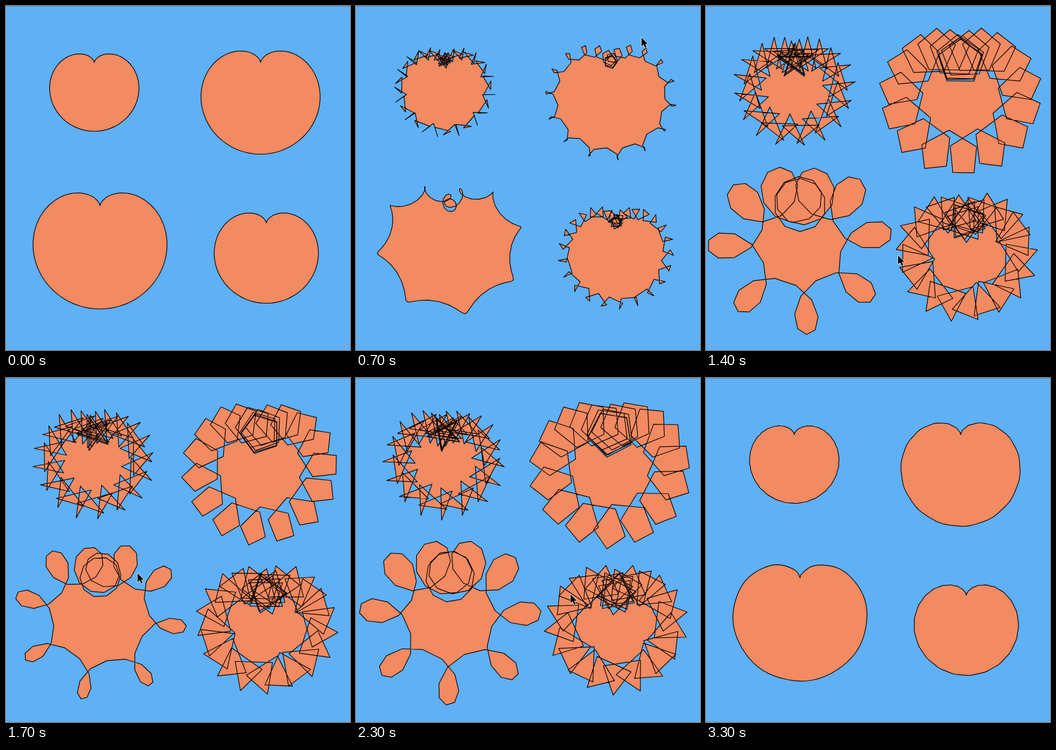
Write an HTML page with a canvas that moves like this. It is 600 px wide and 600 px high and loops after 3.4 s.

```html
<!DOCTYPE html>
<html lang="en">
<head>
<meta charset="utf-8">
<title>Cardioids</title>
<style>
  html, body { margin: 0; width: 100%; height: 100%; overflow: hidden; background: #5fb0f5; }
  canvas { display: block; width: 600px; height: 600px; }
</style>
</head>
<body>
<canvas id="stage" width="600" height="600"></canvas>
<script>
const ctx = document.getElementById('stage').getContext('2d');
const LOOP = 3400, STEP = 100, POINTS = 100;
const FIRST = 1, LAST = 28; // steps with the pointer on stage
const REST = 0.4;           // ripple left once the pointer is gone

const hearts = [
  { x: 154, y: 98.5, size: 60 },
  { x: 444, y: 98.5, size: 80 },
  { x: 164, y: 348.5, size: 90 },
  { x: 454, y: 378.5, size: 70 }
];

// Key poses of the pointer and the ripple radius it drives.
const poses = [
  { step: FIRST, x: 560, y: 150, ripple: 0 },
  { step: 4, x: 420, y: 360, ripple: 36 },
  { step: 7, x: 498, y: 55, ripple: 11.2 },
  { step: 8.5, x: 390, y: 16, ripple: 3 },
  { step: 10, x: 272, y: 127, ripple: 10.5 },
  { step: 14, x: 335, y: 435, ripple: 46 },
  { step: 20, x: 124, y: 246, ripple: 24 },
  { step: 22.5, x: 350, y: 400, ripple: 44 },
  { step: 25, x: 583, y: 182, ripple: 28 },
  { step: LAST, x: 560, y: 34, ripple: 3 }
];

const smooth = u => u * u * (3 - 2 * u);
const mix = (a, b, u) => a + (b - a) * u;

function poseAt(step) {
  const i = Math.max(1, poses.findIndex(p => p.step >= step));
  const a = poses[i - 1], b = poses[i];
  const u = smooth((step - a.step) / (b.step - a.step));
  return { x: mix(a.x, b.x, u), y: mix(a.y, b.y, u), ripple: mix(a.ripple, b.ripple, u) };
}

// Degrees; the spin slows slightly towards the end.
const phaseAt = step => 198 * step - 1296 - 9 * Math.max(0, step - 20);

// A cardioid plus a small circle turning the other way.
function drawHeart({ x, y, size }, ripple, phase) {
  const freq = 100 - size;
  const b = Math.min(ripple, size / 2);
  ctx.beginPath();
  for (let i = 0; i < POINTS; i++) {
    const s = i / POINTS * 2 * Math.PI;
    const r = size * (1 + Math.cos(s));
    const turn = phase - freq * s;
    ctx.lineTo(x + r * Math.sin(s) + b * Math.sin(turn),
               y + r * Math.cos(s) + b * Math.cos(turn));
  }
  ctx.closePath();
  ctx.fillStyle = '#f28a62';
  ctx.fill('nonzero');
  ctx.strokeStyle = '#000';
  ctx.lineWidth = 1.2;
  ctx.lineJoin = 'round';
  ctx.stroke();
}

const arrow = new Path2D('M0 0V15.5L3.6 12.2L6.2 18L8.9 16.8L6.4 11.2H11Z');

function drawPointer({ x, y }) {
  ctx.save();
  ctx.translate(x, y);
  ctx.lineWidth = 1.5;
  ctx.strokeStyle = '#fff';
  ctx.stroke(arrow);
  ctx.fillStyle = '#000';
  ctx.fill(arrow);
  ctx.restore();
}

function draw(step) {
  ctx.fillStyle = '#5fb0f5';
  ctx.fillRect(0, 0, 600, 600);
  ctx.fillStyle = '#5684ad';
  ctx.fillRect(0, 0, 600, 1);
  const pose = step >= FIRST && step <= LAST ? poseAt(step) : null;
  const ripple = pose ? pose.ripple : step > LAST ? REST : 0;
  const phase = phaseAt(step) * Math.PI / 180;
  for (const heart of hearts) drawHeart(heart, ripple, phase);
  if (pose) drawPointer(pose);
}

const start = performance.now();
function tick() {
  const time = (performance.now() - start) % LOOP;
  draw(Math.floor(time / STEP));
  requestAnimationFrame(tick);
}
tick();
</script>
</body>
</html>
```
